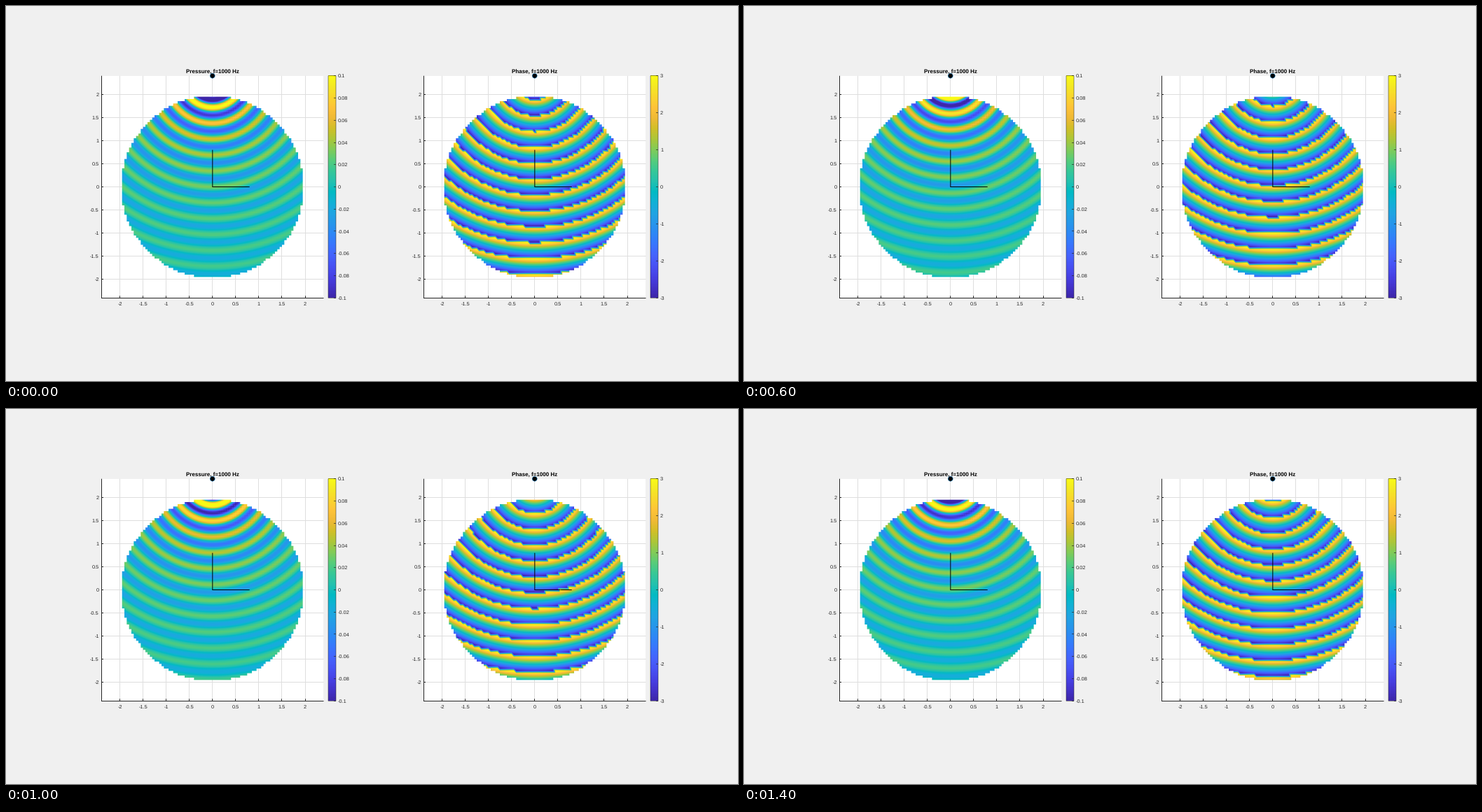
Recreate the animation shown at these times as a matplotlib script. Size 1045 px wide and 536 px high, loop 1500 ms.

```python
import numpy as np
import matplotlib.pyplot as plt
from matplotlib.animation import FuncAnimation
from matplotlib.colors import LinearSegmentedColormap
from matplotlib.patches import Circle, Rectangle

plt.rcParams.update({"font.family": "Liberation Sans", "text.hinting": "no_hinting"})

W, H, DPI = 1045, 536, 100
PX = 72 / DPI                  # points per pixel
FRAMES, INTERVAL = 15, 100
SCALE, LIMIT = 66.14, 2.4      # pixels per metre, half width of the axes
REACH = LIMIT * SCALE
LEFT_CX, RIGHT_CX, CY = 294.75, 754.75, 258.5
INK = "#262626"

SOURCE_Y = 2.4
WAVE_NUMBER = 2 * np.pi * 1000 / 343
STEP, CELLS = 0.05, 80         # mesh covering -2..2 m
HALF, SUB = 131, 3             # raster half size in pixels, subsamples per pixel

PARULA = LinearSegmentedColormap.from_list("parula", [
    (.242, .150, .660), (.265, .198, .795), (.278, .256, .899), (.281, .323, .958),
    (.270, .389, .991), (.221, .460, .997), (.179, .529, .968), (.154, .590, .922),
    (.125, .646, .888), (.069, .695, .839), (.007, .731, .766), (.141, .758, .684),
    (.216, .784, .592), (.341, .801, .479), (.504, .799, .348), (.672, .779, .223),
    (.820, .750, .154), (.939, .729, .210), (.997, .766, .220), (.979, .839, .177),
    (.960, .914, .142), (.977, .984, .081)], N=256)

# Mesh vertices, masked to a disc of radius 2 m
index = np.arange(-CELLS // 2, CELLS // 2 + 1)
ix, iy = np.meshgrid(index, index)
inside = ix**2 + iy**2 < (CELLS // 2) ** 2
cell_ok = inside[:-1, :-1] & inside[:-1, 1:] & inside[1:, :-1] & inside[1:, 1:]
distance = np.maximum(np.hypot(ix * STEP, iy * STEP - SOURCE_Y), 0.1)


def sample_offsets(center):
    """Subsample distances from the centre, for a raster on whole pixels."""
    return (np.arange(2 * HALF * SUB) + 0.5) / SUB - HALF - center % 1


# Both panels share the same subpixel position, so one sampling serves both
dx, dy = np.meshgrid(sample_offsets(LEFT_CX), -sample_offsets(CY))
u = dx / SCALE / STEP + CELLS / 2
v = dy / SCALE / STEP + CELLS / 2
col = np.clip(np.floor(u).astype(int), 0, CELLS - 1)
row = np.clip(np.floor(v).astype(int), 0, CELLS - 1)
fu, fv = u - col, v - row
visible = cell_ok[row, col] & (fu >= 0) & (fu <= 1) & (fv >= 0) & (fv <= 1)
arm = 0.8 * SCALE
cross = ((abs(dx) < 0.5) & (dy > -0.5) & (dy < arm)) | \
        ((abs(dy) < 0.5) & (dx > -0.5) & (dx < arm))


def interpolate(z):
    """Linear shading on cells split from upper left to lower right."""
    z00, z10 = z[row, col], z[row, col + 1]
    z01, z11 = z[row + 1, col], z[row + 1, col + 1]
    lower = z00 + fu * (z10 - z00) + fv * (z01 - z00)
    upper = z11 + (1 - fu) * (z01 - z11) + (1 - fv) * (z10 - z11)
    return np.where(fu + fv <= 1, lower, upper)


def shade(z, top, line_height):
    """Colour the surface; the cross is hidden where the surface rises above it."""
    values = interpolate(z)
    rgba = PARULA((values + top) / (2 * top))
    rgba[cross & (values <= line_height), :3] = 0
    rgba[..., 3] = visible
    rgba[..., :3] *= visible[..., None]
    small = rgba.reshape(2 * HALF, SUB, 2 * HALF, SUB, 4).mean(axis=(1, 3))
    small[..., :3] /= np.maximum(small[..., 3:], 1e-6)
    return np.clip(small, 0, 1)


def wave(frame):
    phase = np.angle(np.exp(1j * (2 * np.pi * frame / FRAMES - WAVE_NUMBER * distance)))
    return np.cos(phase) / (4 * np.pi * distance), phase


fig = plt.figure(figsize=(W / DPI, H / DPI), dpi=DPI, facecolor="#f0f0f0")
ax = fig.add_axes([0, 0, 1, 1])
ax.set_xlim(0, W)
ax.set_ylim(H, 0)
ax.axis("off")


def vline(x, y0, y1, color=INK, z=3):
    x = np.floor(x) + 0.5
    ax.plot([x, x], [y0, y1], color=color, lw=PX, zorder=z,
            solid_capstyle="butt", snap=False)


def hline(y, x0, x1, color=INK, z=3, width=1):
    y = np.floor(y) + 0.5
    ax.plot([x0, x1], [y, y], color=color, lw=width * PX, zorder=z,
            solid_capstyle="butt", snap=False)


def label(x, y, text, align, size=7.4, **style):
    ax.text(x, y + 0.36 * size, text, ha=align, va="baseline",
            fontsize=size * PX, zorder=6, **{"color": INK, **style})


def colorbar(x, top, ticks):
    ax.imshow(np.linspace(1, 0, 256)[:, None], cmap=PARULA, vmin=0, vmax=1,
              extent=(x, x + 11, CY + REACH, CY - REACH), aspect="auto",
              interpolation="nearest", zorder=2)
    ax.add_patch(Rectangle((x, CY - REACH), 11, 2 * REACH, fill=False,
                           ec=INK, lw=0.5 * PX, zorder=3, snap=False))
    for tick in ticks:
        y = CY - tick / top * REACH
        hline(y, x + 8, x + 11, width=0.7)
        label(x + 14, y, f"{tick:g}", "left")


def panel(cx, title, top, ticks):
    left, right, upper, lower = cx - REACH, cx + REACH, CY - REACH, CY + REACH
    ax.add_patch(Rectangle((left, upper), 2 * REACH, 2 * REACH, fc="white", lw=0, zorder=0))
    for value in np.arange(-2, 2.1, 0.5):
        x, y = cx + value * SCALE, CY - value * SCALE
        vline(x, upper, lower, "#dedede", 1)
        hline(y, left, right, "#dedede", 1)
        vline(x, lower - 3, lower)
        hline(y, left, left + 3)
        label(x, 425.5, f"{value:g}", "center")
        label(left - 3.2, y, f"{value:g}", "right")
    vline(left, upper, lower + 0.5)
    hline(lower, left, right)
    label(cx, 93.4, title, "center", 8, weight="bold", color="black")
    ax.add_patch(Circle((cx, upper), 3.4, fc="black", ec="#0072bd",
                        lw=0.5 * PX, zorder=7))
    colorbar(cx + 165.25, top, ticks)
    x0, y0 = int(cx) - HALF, int(CY) - HALF
    return ax.imshow(np.zeros((2 * HALF, 2 * HALF, 4)), aspect="auto",
                     extent=(x0, x0 + 2 * HALF, y0 + 2 * HALF, y0),
                     interpolation="nearest", zorder=2)


pressure_image = panel(LEFT_CX, "Pressure, f=1000 Hz", 0.1, np.arange(-5, 6) / 50)
phase_image = panel(RIGHT_CX, "Phase, f=1000 Hz", 3, range(-3, 4))


def draw(frame):
    pressure, phase = wave(frame)
    pressure_image.set_data(shade(pressure, 0.1, np.inf))
    phase_image.set_data(shade(phase, 3, 3))
    return pressure_image, phase_image


animation = FuncAnimation(fig, draw, frames=FRAMES, interval=INTERVAL, repeat=True)
plt.show()
```
